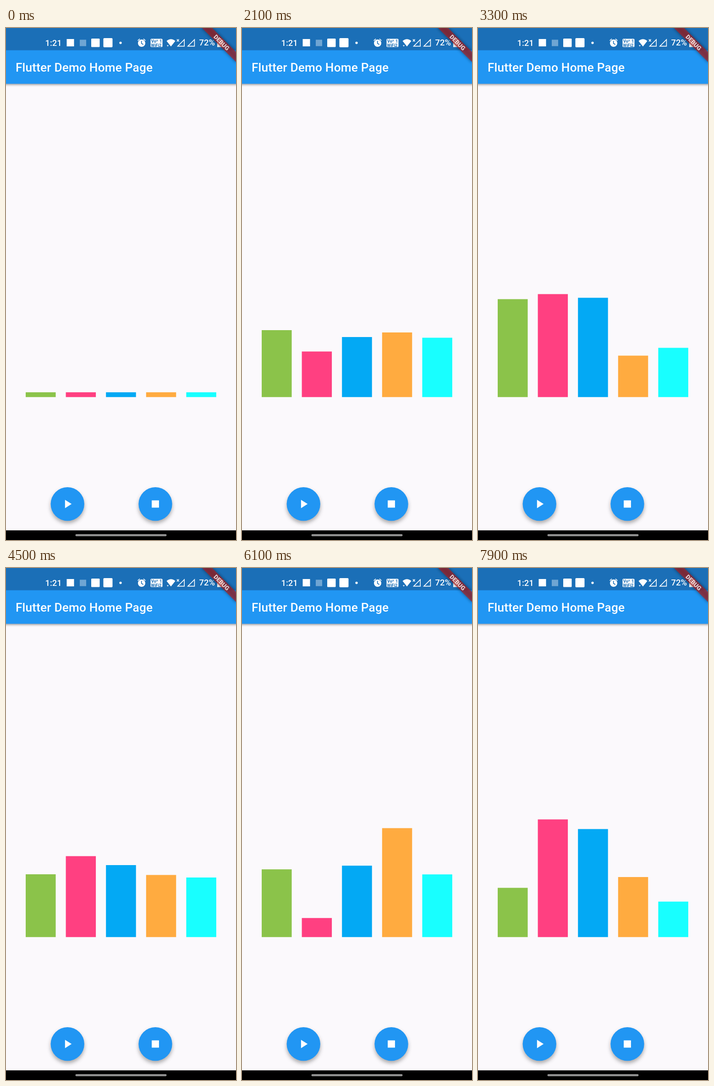
Recreate the animation shown at these times as an HTML page. Size 502 px wide and 1115 px high, loop 8.2 s.

```html
<!DOCTYPE html>
<html lang="en">
<head>
<meta charset="utf-8">
<title>Animated bars</title>
<style>
  html, body { margin: 0; width: 100%; height: 100%; overflow: hidden; background: #fbf9fc; }
  svg { display: block; }
  text { font-family: Roboto, sans-serif; font-weight: 500; fill: #fff; }
  .app-bar { fill: #2196f3; filter: drop-shadow(0 2px 2.5px rgba(0, 0, 0, .4)); }
  .fab { fill: #2196f3; filter: drop-shadow(0 5px 4px rgba(0, 0, 0, .32)); }
  .white { fill: #fff; }
  .line { fill: none; stroke: #fff; stroke-width: 1.6; }
  .badge { font-size: 9px; font-weight: 700; fill: #1b6fb7; }

  /* Bar tops at the turning points; the picture advances every 100 ms. */
  .bar { y: 793.3px; animation: level 8200ms infinite; }
  @keyframes level {
    0%      { y: 793.3px; animation-timing-function: step-end; }
    15.85%  { y: 793.3px; animation-timing-function: steps(8); }
    25.605% { y: var(--a); animation-timing-function: steps(12); }
    40.24%  { y: var(--b); animation-timing-function: steps(12); }
    54.875% { y: var(--c); animation-timing-function: steps(8); }
    64.63%  { y: var(--d); animation-timing-function: steps(16); }
    84.14%  { y: var(--e); animation-timing-function: steps(10); }
    96.335%, 100% { y: var(--f); }
  }
</style>
</head>
<body>
<svg width="502" height="1115" viewBox="0 0 502 1115">
  <defs>
    <filter id="soft" x="-30%" y="-100%" width="160%" height="300%">
      <feGaussianBlur stdDeviation="3.5"/>
    </filter>
  </defs>
  <rect width="502" height="1115" fill="#fbf9fc"/>

  <rect class="app-bar" x="-10" y="-10" width="522" height="131.5"/>
  <rect width="502" height="48.5" fill="#1b6fb7"/>
  <text x="21" y="95" font-size="26.2" letter-spacing=".2">Flutter Demo Home Page</text>

  <g id="status">
    <text x="85.5" y="38.5" font-size="18.4">1:21</text>
    <rect class="white" x="132.5" y="24" width="16" height="16"/>
    <rect x="161" y="25.5" width="14" height="14" fill="#6fa5d3"/>
    <rect class="white" x="186" y="23" width="18.5" height="18.5" rx="1.5"/>
    <rect class="white" x="212.5" y="22" width="20" height="20" rx="2"/>
    <circle class="white" cx="250" cy="32.3" r="2.6"/>

    <circle class="white" cx="296" cy="33" r="8"/>
    <path d="M287.5 27.5l4.5-3.8M304.5 27.5l-4.5-3.8" class="line" stroke-width="2"/>
    <path d="M295.7 28v5.5l4 2.5" fill="none" stroke="#1b6fb7" stroke-width="1.6"/>

    <rect class="white" x="315.5" y="23.5" width="26" height="18" rx="2"/>
    <text class="badge" x="317" y="32">Vo^</text>
    <text class="badge" x="335" y="32">1</text>
    <text class="badge" x="316.5" y="40.5">WiFi2</text>

    <path class="white" d="M350.5 28.2Q360 20.5 369.5 28.2L360 40.3Z"/>
    <path class="white" d="M351 37.5h4l-2 3z"/>
    <path class="line" d="M373 24.5l4.5 5M377.5 24.5l-4.5 5" stroke-width="1.2"/>
    <path class="line" d="M374.8 39.6L389.2 25.2V39.6Z"/>
    <path class="line" d="M397 39.6L411.4 25.2V39.6Z"/>
    <text x="421.5" y="38.3" font-size="18.4">72%</text>
    <path class="white" d="M461 25.5h3.5V23h6v2.5h3.5V41.5H461Z"/>
  </g>

  <g transform="translate(502 0) rotate(45)">
    <rect x="-54" y="36.7" width="108" height="15.7" filter="url(#soft)" opacity=".45"/>
    <rect x="-54" y="36.7" width="108" height="15.7" fill="#b71c1c" fill-opacity=".627"/>
    <text y="49.3" font-size="13.2" text-anchor="middle" style="font-weight: 900" fill-opacity=".8">DEBUG</text>
  </g>

  <svg width="502" height="803.7">
    <rect class="bar" x="43" width="65.5" height="400" fill="#8bc34a"
      style="--a:658px; --b:590.5px; --c:667px; --d:715px; --e:597.5px; --f:696.5px"/>
    <rect class="bar" x="130.6" width="65.5" height="400" fill="#ff4081"
      style="--a:704.5px; --b:579.5px; --c:627.5px; --d:759px; --e:765.5px; --f:547.5px"/>
    <rect class="bar" x="218.2" width="65.5" height="400" fill="#03a9f4"
      style="--a:673px; --b:587.5px; --c:647px; --d:680.5px; --e:616px; --f:568.5px"/>
    <rect class="bar" x="305.8" width="65.5" height="400" fill="#ffab40"
      style="--a:663px; --b:713.5px; --c:668.5px; --d:563px; --e:570px; --f:673px"/>
    <rect class="bar" x="393.4" width="65.5" height="400" fill="#18ffff"
      style="--a:674.5px; --b:696.5px; --c:674px; --d:656.5px; --e:678px; --f:726.5px"/>
  </svg>

  <circle class="fab" cx="134.2" cy="1036.6" r="36.7"/>
  <path class="white" d="M128.8 1027.4L143.2 1036.6L128.8 1045.8Z"/>
  <circle class="fab" cx="326" cy="1036.6" r="36.7"/>
  <rect class="white" x="318.1" y="1028.7" width="15.8" height="15.8"/>

  <rect y="1094" width="502" height="21"/>
  <rect x="151.5" y="1102.3" width="199" height="4.4" rx="2.2" fill="#949494"/>
</svg>
</body>
</html>
```
